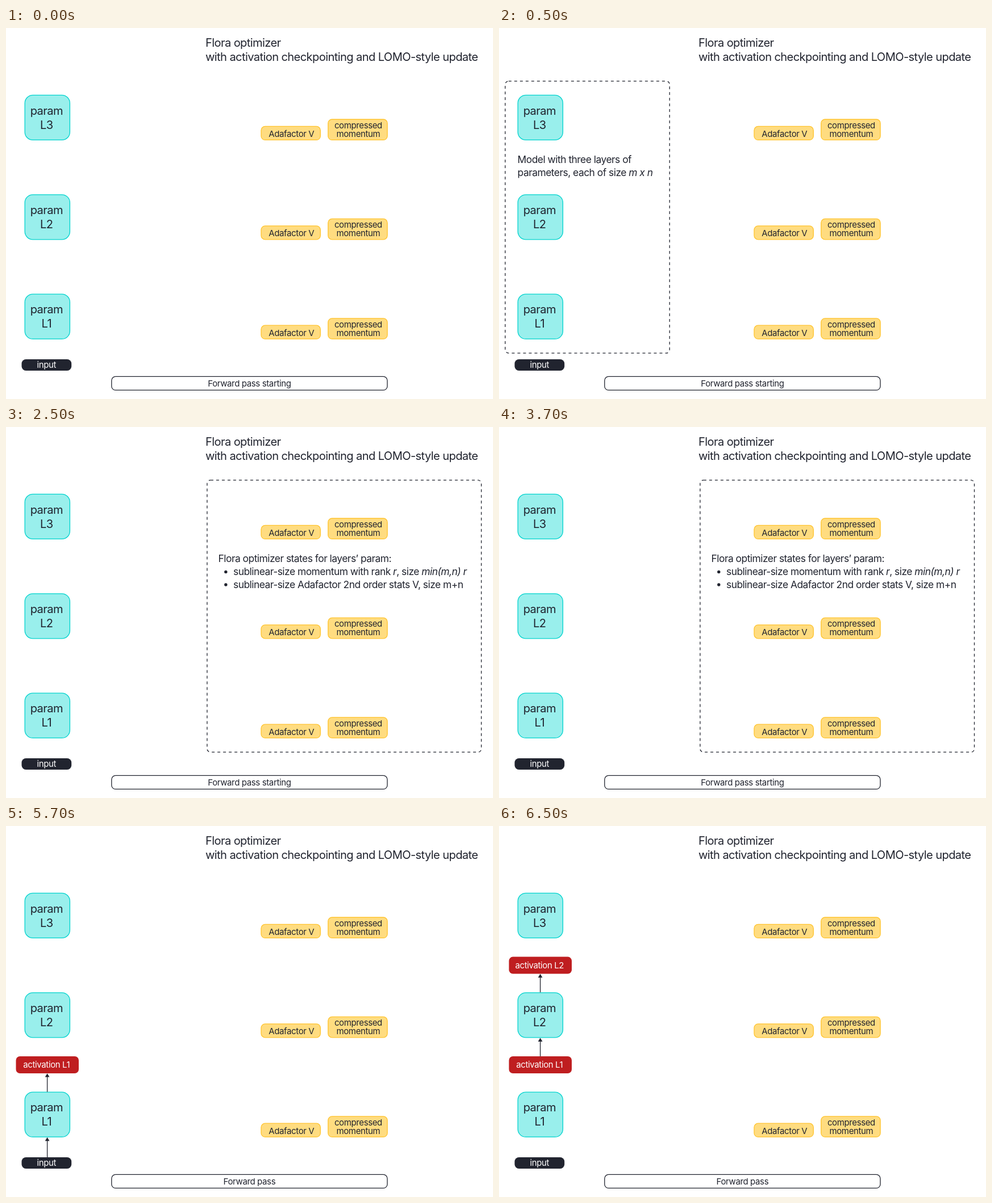
An HTML page that plays this animation: 857 px wide and 654 px high, repeating every 8000 ms.

```html
<!DOCTYPE html>
<html lang="en">
<head>
<meta charset="utf-8">
<title>Flora optimizer</title>
<style>
  html, body { margin: 0; width: 100%; height: 100%; overflow: hidden; background: #fff; }
  svg { display: block; width: 857px; height: 654px; }
  text { font-family: Inter, sans-serif; fill: #21242f; white-space: pre; letter-spacing: -0.025em; }
  .big { font-size: 20.1px; letter-spacing: -0.03em; }
  .note { font-size: 17.4px; letter-spacing: -0.029em; }
  .small { font-size: 15px; }
  .light { fill: #fff; }
  .mid { text-anchor: middle; }
</style>
</head>
<body>
<svg id="stage" viewBox="0 0 857 654"></svg>
<script>
const INK = '#21242f';
const LOOP = 8000;

const box = (x, y, w, h, r, fill, stroke = 'none', extra = '') =>
  `<rect x="${x}" y="${y}" width="${w}" height="${h}" rx="${r}" fill="${fill}" stroke="${stroke}" stroke-width="1.3" ${extra}/>`;
const text = (x, y, cls, s) => `<text x="${x}" y="${y}" class="${cls}">${s}</text>`;
const dashed = (x, w) => box(x, 93.6, w, 479.6, 6, 'none', INK, 'stroke-dasharray="5 5"');
const arrow = (from, to) =>
  `<path d="M72.6 ${from}V${to + 4}" stroke="${INK}" stroke-width="1.3"/>` +
  `<path d="M72.6 ${to}l3.9 6.4h-7.8z" fill="${INK}"/>`;
const activation = (y, n) =>
  box(17.5, y, 110.5, 30, 7, '#bf1e20') + text(71.3, y + 20.2, 'small light mid', 'activation L' + n);
const italic = s => `<tspan font-style="italic">${s}</tspan>`;
// visible from start to end, in ms
const scene = (start, end, body) => `<g data-start="${start}" data-end="${end}">${body}</g>`;

function layer(n) {
  const y = 469.2 - 175.4 * (n - 1);
  return box(33.2, y, 79.2, 79, 14, '#99efec', '#00d3ce') +
    text(71.3, y + 34.1, 'big mid', 'param') +
    text(71.3, y + 59.2, 'big mid', 'L' + n) +
    box(449, y + 55, 104.3, 24, 7, '#ffdc80', '#ffc42e') +
    text(502.3, y + 73.3, 'small mid', 'Adafactor V') +
    box(566.8, y + 42.6, 104.3, 36.4, 7, '#ffdc80', '#ffc42e') +
    text(619.9, y + 58.5, 'small mid', 'compressed') +
    text(619.9, y + 73.3, 'small mid', 'momentum');
}

const bullet = y => `<circle cx="386.8" cy="${y}" r="2.7" fill="${INK}"/>`;

const stage = document.getElementById('stage');
stage.innerHTML =
  text(351, 33, 'big', 'Flora optimizer') +
  text(351, 58, 'big', 'with activation checkpointing and LOMO-style update') +
  [1, 2, 3].map(layer).join('') +
  box(27.5, 584, 87.7, 20, 7.5, INK) +
  text(71.3, 599, 'small light mid', 'input') +
  box(185.8, 614.4, 485.2, 24, 7, '#fff', INK) +
  scene(0, 4500, text(428.4, 631.7, 'small mid', 'Forward pass starting')) +
  scene(4500, LOOP, text(428.4, 631.7, 'small mid', 'Forward pass') + activation(406, 1)) +
  scene(500, 2500, dashed(10.9, 289.3) +
    text(32.6, 238.2, 'note', 'Model with three layers of') +
    text(32.6, 261, 'note', 'parameters, each of size ' + italic('m x n'))) +
  scene(2500, 4500, dashed(353.9, 482.6) +
    text(373.5, 238.2, 'note', 'Flora optimizer states for layers’ param:') +
    bullet(255.4) +
    text(400, 261, 'note', `sublinear-size momentum with rank ${italic('r')}, size ${italic('min(m,n) r')}`) +
    bullet(278) +
    text(400, 283.6, 'note', 'sublinear-size Adafactor 2nd order stats V, size m+n')) +
  scene(4500, 6500, arrow(584, 548.8) + arrow(468.7, 436.2)) +
  scene(6500, LOOP, arrow(406, 373.6) + arrow(293.2, 260.8) + activation(230.6, 2));

const scenes = [...stage.querySelectorAll('g')];
const t0 = performance.now();

function draw() {
  const t = Math.max(0, performance.now() - t0) % LOOP;
  for (const g of scenes) {
    const on = t >= +g.dataset.start && t < +g.dataset.end;
    g.style.display = on ? '' : 'none';
  }
  requestAnimationFrame(draw);
}
draw();
</script>
</body>
</html>
```
